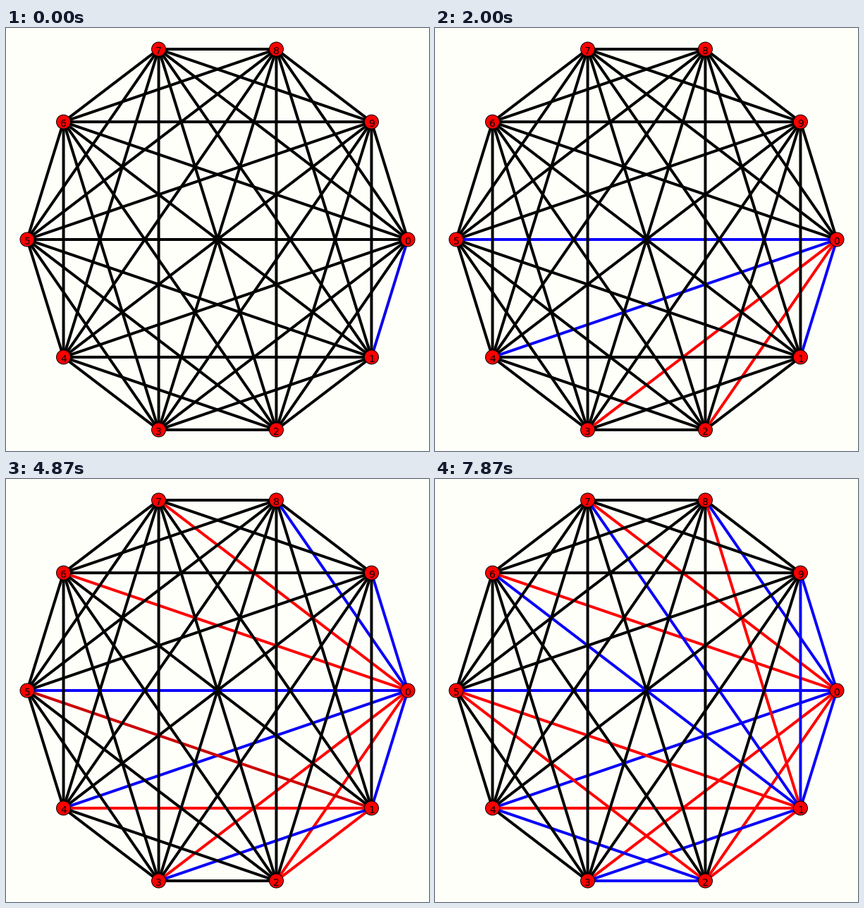
These frames come from a looping animation (600x600 px, 8000 ms). A matplotlib script:

```python
from itertools import combinations
from math import cos, sin, tau

import matplotlib.pyplot as plt
from matplotlib.animation import FuncAnimation
from matplotlib.patches import Circle

SIZE, DPI = 600, 100
PX = 72 / DPI                      # one pixel in points
FRAMES, INTERVAL = 160, 50
NODES = 10
STEP, FIRST, FADE = 400, 50, 150   # ms between edges, first onset, fade length
BASE = {"R": (1, 0, 0), "B": (0.04, 0, 0.98)}
SEQUENCE = "BRRBBRRBBRBRRBBRBBBR"

fig = plt.figure(figsize=(SIZE / DPI, SIZE / DPI), dpi=DPI, facecolor="#fffffa")
ax = fig.add_axes([0, 0, 1, 1])
ax.set(xlim=(0, SIZE), ylim=(SIZE, 0))
ax.axis("off")


def node_pos(k):
    """Place node k on a ring stretched to fill the square, clockwise from the right."""
    a = tau * k / NODES
    return 300 + 270 * cos(a), 300 + 270 * sin(a) / sin(tau / 5)


points = [node_pos(k) for k in range(NODES)]

edges = []
for order, (a, b) in enumerate(combinations(points, 2)):
    line, = ax.plot(*zip(a, b), color="black", lw=4 * PX, solid_capstyle="butt",
                    snap=False, zorder=2 + order / 100)
    edges.append(line)

for k, (x, y) in enumerate(points):
    ax.add_patch(Circle((x, y), 10, fc="red", ec="black", lw=PX, zorder=4))
    ax.text(x, y + 7, str(k), family="DejaVu Sans", size=14 * PX,
            ha="center", va="baseline", zorder=5)


def edge_color(order, t):
    # The first edge is already coloured when the loop begins.
    onset = FIRST + STEP * order if order else -100
    if t < onset:
        return "black"
    level = min(1, 0.8 + 0.2 * (t - onset) / FADE)
    return tuple(level * c for c in BASE[SEQUENCE[order]])


def update(frame):
    t = frame * INTERVAL
    for order in range(len(SEQUENCE)):
        edges[order].set_color(edge_color(order, t))
    return edges


anim = FuncAnimation(fig, update, frames=FRAMES, interval=INTERVAL,
                     init_func=lambda: update(0), repeat=True, repeat_delay=0)
plt.show()
```
